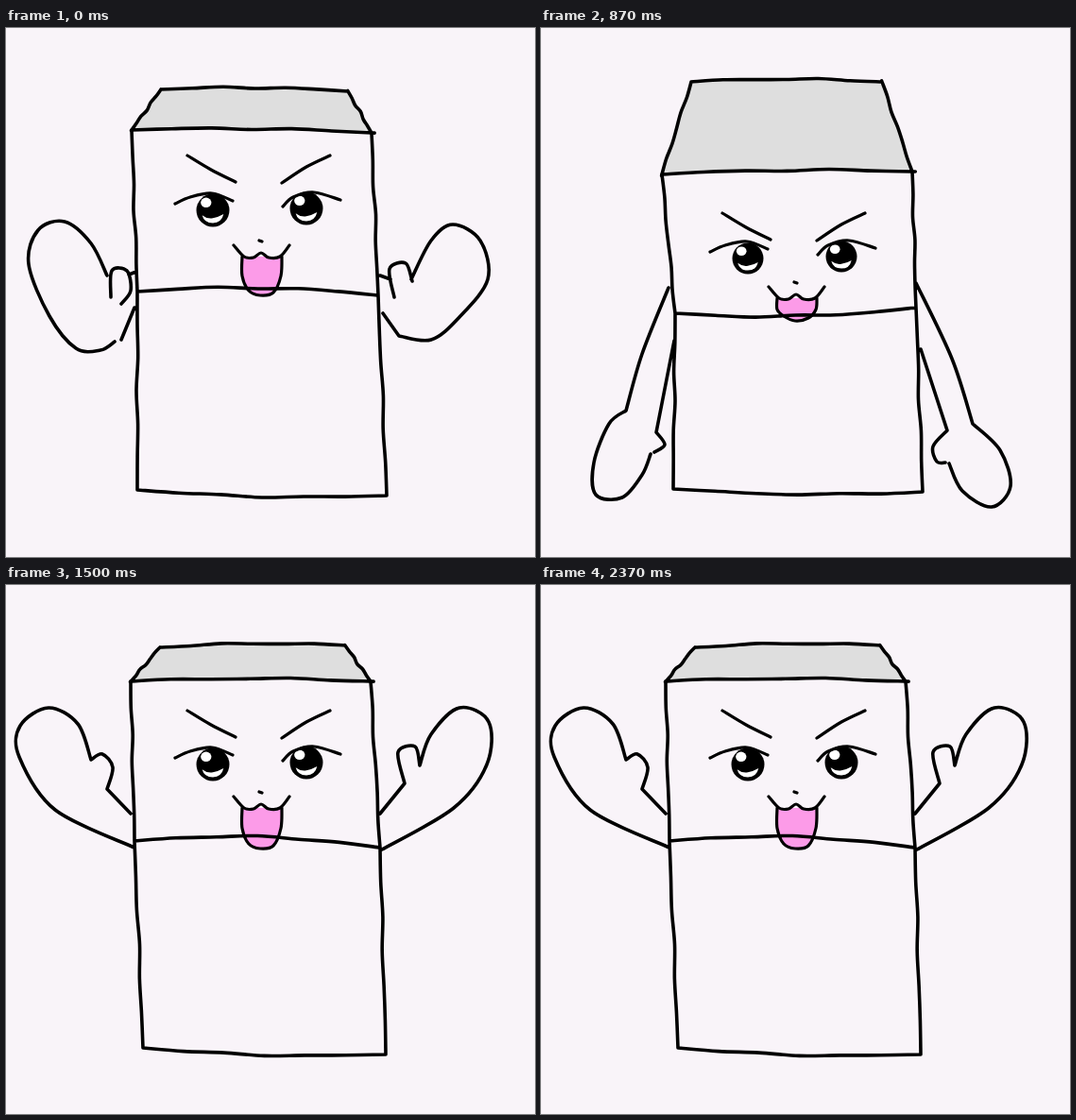
An HTML page that plays this animation: 560x560 px, repeating every 2.5 s.

```html
<!DOCTYPE html>
<html lang="en">
<head>
<meta charset="utf-8">
<title>Waving carton</title>
<style>
html, body { margin: 0; width: 100%; height: 100%; overflow: hidden; background: #f9f4f9; }
svg { display: block; width: 560px; height: 560px; }
path { fill: none; stroke: #000; stroke-width: 3.6; stroke-linecap: round; stroke-linejoin: round; }
.face { stroke-width: 3.2; }
.crown { fill: #dedede; }
.tongue { fill: #fc9be8; stroke-width: 3.2; }
.shine { fill: #fff; stroke: none; }
</style>
</head>
<body>
<svg id="stage" viewBox="0 0 560 560"></svg>
<script>
// Strokes list points; "," lifts the pen and "/" makes a sharp corner.
const level = {
  top: '164 65 362 67', head: '133 108 387 111', chin: '139 279 394 283', base: '139 489 403 495',
  bow: -6, brow: 135, lid: 186, mouth: 242, tongue: 283, eye: 17.5,
  left: '107 262 90 228 62 205 34 214 24 250 46 305 74 339 100 341 115 332,122 292 132 278 128 257 112 257 111 285,130 261 138 258,136 296 122 330',
  right: '429 266 450 225 473 208 502 225 510 266 480 306 450 330 416 326/399 302,411 285 406 255 423 249 430 268,396 262 407 266'
};

const dip = {
  top: '163 64 363 61', head: '122 143 399 139', chin: '141 298 396 295', base: '144 487 404 491',
  bow: 4, brow: 193, lid: 234, mouth: 284, tongue: 309, eye: 17,
  left: '135 275 110 320 92 349,85 353 56 371 47 405 71 436 101 430 111 414,138 337 125 387/132 402 116 411',
  right: '396 271 421 308 441 342,443 346 472 363 481 405 456 436 428 428 411 398,399 333 408 375,410 376 399 388 412 398'
};

const low = {
  top: '159 57 361 57', head: '128 155 393 152', chin: '142 302 397 296', base: '140 488 404 491',
  bow: 6, brow: 196, lid: 237, mouth: 286, tongue: 310, eye: 16.5,
  left: '135 275 107 345 90 405/72 419 56 460 58 494 86 497 107 473 116 451,141 331 122 428/131 441 120 449',
  right: '397 270 435 350 457 419/486 447 497 485 477 507 446 490 432 461,402 340 430 426/415 443 419 459 428 460'
};

const lift = {
  top: '163 66 359 64', head: '132 102 386 102', chin: '136 271 396 278', base: '145 490 402 497',
  bow: -8, brow: 133, lid: 183, mouth: 236, tongue: 279, eye: 17.5,
  left: '136 278 52 238 14 182 15 149 45 130 76 147 90 185/102 179 113 193 107 216/132 242',
  right: '398 280 474 236 509 190 511 145 480 130 450 158 438 191/433 171 415 177 422 210/396 242'
};

const high = {
  top: '161 67 359 66', head: '130 95 386 93', chin: '136 265 392 265', base: '145 488 404 492',
  bow: -3, brow: 125, lid: 175, mouth: 229, tongue: 269, eye: 19,
  left: '133 265 63 155 26 85 35 37 62 20 88 38 99 96,94 97 111 87 116 115 103 129/131 217',
  right: '395 277 420 220 465 130 475 62 440 22 408 55 404 100,410 104 396 93 394 112 405 131/404 165 392 222'
};

const brows = '192 0 217 15 243 28,292 29 318 12 343 0';
const lids = '179 0 195 -7 218 -11 240 -3,293 3 304 -7 326 -12 354 -4';
const smile = '268 -17 271 -16,241 -12 252 0 262 1 270 -4 278 1 290 0 300 -12';

const move = (stroke, fn) => stroke.replace(/(\d+) (\d+)/g,
  (_, x, y) => fn(+x, +y).map(v => v.toFixed(1)).join(' '));

// Tips the head by dy and swings both arms inward about the shoulders.
function exaggerate(pose, dy, turn) {
  const swing = (cx, cy, a) => (x, y) => [
    cx + (x - cx) * Math.cos(a) - (y - cy) * Math.sin(a),
    cy + (x - cx) * Math.sin(a) + (y - cy) * Math.cos(a)];
  const out = { ...pose };
  for (const key of ['head', 'chin']) out[key] = move(pose[key], (x, y) => [x, y + dy]);
  for (const key of ['brow', 'lid', 'mouth', 'tongue']) out[key] += dy;
  out.left = move(pose.left, swing(135, 270, turn));
  out.right = move(pose.right, swing(396, 274, -turn));
  return out;
}

function pairs(text) {
  const n = text.split(' ').map(Number);
  return n.filter((_, i) => i % 2 === 0).map((x, i) => [x, n[2 * i + 1]]);
}

// Smooth curve through the points
function trace(stroke) {
  return stroke.split(',').map(line => {
    let last, d = '';
    for (const piece of line.split('/')) {
      const p = pairs(piece);
      if (last) p.unshift(last); else d = 'M' + p[0];
      for (let i = 1; i < p.length; i++) {
        const a = p[i - 1], b = p[i], before = p[i - 2] || a, after = p[i + 1] || b;
        const c1 = a.map((v, k) => v + (b[k] - before[k]) / 6);
        const c2 = b.map((v, k) => v - (after[k] - a[k]) / 6);
        d += `C${c1} ${c2} ${b}`;
      }
      last = p[p.length - 1];
    }
    return d;
  }).join('');
}

// Slightly shaky hand-drawn edge, bowed sideways
function edge(a, b, bow = 0) {
  const dx = b[0] - a[0], dy = b[1] - a[1], len = Math.hypot(dx, dy);
  const points = [];
  for (let i = 0; i <= 6; i++) {
    const t = i / 6, arch = 4 * t * (1 - t);
    const off = arch * (bow + Math.sin(t * 14 + a[0]));
    points.push(a[0] + dx * t - dy / len * off, a[1] + dy * t + dx / len * off);
  }
  return points.map(v => v.toFixed(1)).join(' ');
}

const draw = (stroke, kind, y = 0) =>
  `<path class="${kind}" transform="translate(0 ${y})" d="${trace(stroke)}"/>`;

const eye = (x, y, r) => `<g transform="translate(${x} ${y}) scale(${r / 17})">
  <circle r="17"/><ellipse class="shine" cx="-7" cy="-8" rx="5.5" ry="5"/>
  <path class="shine" d="M-11 5Q-6 9 0 8T11 4Q9 13 0 13T-11 5"/></g>`;

function render(p) {
  const [[t1, t2], [h1, h2], [c1, c2], [b1, b2]] = [p.top, p.head, p.chin, p.base].map(pairs);
  const crown = [edge(t1, t2, -3), edge(t2, h2), edge(h2, h1, 3), edge(h1, t1)].join('/');
  const box = [edge(h1, c1), edge(c1, b1), edge(h2, c2), edge(c2, b2), edge(b1, b2, 4)].join(',');
  const m = p.mouth, end = p.tongue, mid = (m + end) / 2;
  const tongue = `250 ${m} 250 ${mid} 257 ${end - 5} 269 ${end} 283 ${end - 3} 291 ${mid} 292 ${m}`;
  const lines = [edge(c1, c2, p.bow), box, p.left, p.right].join(',');
  return '<g>' + draw(crown, 'crown') + draw(tongue, 'tongue') + draw(lines, 'line') +
    eye(219, p.lid + 7, p.eye) + eye(318, p.lid + 5, p.eye) +
    draw(brows, 'face', p.brow) + draw(lids, 'face', p.lid) + draw(smile, 'face', m) + '</g>';
}

const lowest = exaggerate(low, 6, -0.035);
const highest = exaggerate(high, -5, 0.035);
const poses = [level, dip, low, lowest, lift, high, highest];
const schedule = [
  [250, level], [500, dip], [620, low], [870, lowest], [1120, low], [1250, dip],
  [1500, level], [1750, lift], [1870, high], [2120, highest], [2370, high], [2500, lift]
];

const stage = document.getElementById('stage');
stage.innerHTML = poses.map(render).join('');
const groups = [...stage.children];

function tick() {
  const t = performance.now() % 2500;
  const current = poses.indexOf(schedule.find(([end]) => t < end)[1]);
  groups.forEach((g, i) => { g.style.display = i === current ? '' : 'none'; });
  requestAnimationFrame(tick);
}
tick();
</script>
</body>
</html>
```
